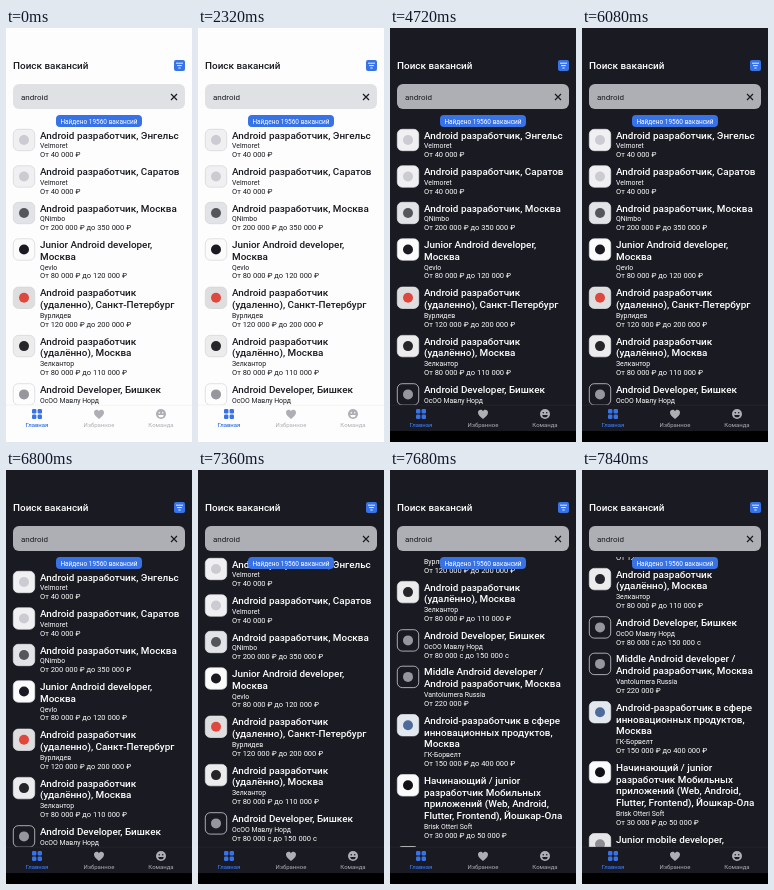
An HTML page that plays this animation: 186x414 px, repeating every 8 s.

```html
<!DOCTYPE html>
<html lang="ru">
<head>
<meta charset="utf-8">
<style>
  html, body { margin: 0; width: 100%; height: 100%; overflow: hidden; }
  svg {
    display: block; width: 100vw; height: 100vh;
    --bg: #fdfdfd; --ink: #1a1b22; --field: #e0e1e4; --edge: #d3d4d8; --line: #e6e8eb; --strip: #fdfdfd; --idle: #aeafb4;
    background: var(--bg); fill: var(--ink);
    font-family: Roboto, "Noto Sans", sans-serif;
  }
  svg.dark { --bg: #1a1b22; --ink: #fdfdfd; --field: #aeafb4; --edge: #e6e8eb; --line: #2a2b31; --strip: #000; }
  .bg { fill: var(--bg); }
  .blue { fill: #3772e7; }
  .title { font-size: 9.9px; font-weight: 500; }
  .firm { font-size: 6.9px; }
  .pay { font-size: 7.5px; }
  .tile { stroke: var(--edge); stroke-width: .7; }
  .nav { font-size: 6px; text-anchor: middle; fill: var(--idle); }
  .nav .blue { fill: #3772e7; font-weight: 500; }
</style>
</head>
<body>
<svg id="app" viewBox="0 0 186 414">
  <clipPath id="view"><rect y="87" width="186" height="327"/></clipPath>
  <g clip-path="url(#view)"><g id="list"></g></g>

  <text class="title" x="7" y="41.2">Поиск вакансий</text>
  <rect class="blue" x="168" y="32" width="11" height="11" rx="2"/>
  <path d="M170 35.2h7M171.2 37.6h4.6M172.4 40h2.2" stroke="#fff" stroke-width=".9"/>

  <rect x="7" y="56" width="172" height="25" rx="6" fill="var(--field)"/>
  <text x="15" y="71.6" font-size="8" fill="#1a1b22">android</text>
  <path d="M165 66l6 6m0-6l-6 6" stroke="#1a1b22" stroke-width="1.2"/>

  <rect class="blue" x="50" y="87" width="86" height="12" rx="4"/>
  <text x="93" y="95.8" font-size="6.5" text-anchor="middle" fill="#fff">Найдено 19560 вакансий</text>

  <g id="nav" class="nav">
    <rect class="bg" y="377" width="186" height="40"/>
    <path d="M0 377.2h186" stroke="var(--line)" stroke-width=".5"/>
    <g class="blue">
      <rect x="26" y="381" width="4.4" height="4.4" rx="1.2"/>
      <rect x="31.6" y="381" width="4.4" height="4.4" rx="1.2"/>
      <rect x="26" y="386.6" width="4.4" height="4.4" rx="1.2"/>
      <rect x="31.6" y="386.6" width="4.4" height="4.4" rx="1.2"/>
      <text x="31" y="399.2">Главная</text>
    </g>
    <path d="M93 391C90 388.6 88 387 88 384.6C88 381.6 91.6 380.8 93 383.2C94.4 380.8 98 381.6 98 384.6C98 387 96 388.6 93 391Z"/>
    <text x="93" y="399.2">Избранное</text>
    <circle cx="155" cy="386" r="5"/>
    <circle class="bg" cx="153.3" cy="384.8" r=".8"/>
    <circle class="bg" cx="156.7" cy="384.8" r=".8"/>
    <path class="bg" d="M152.3 387h5.4a2.7 2.3 0 0 1-5.4 0"/>
    <text x="155" y="399.2">Команда</text>
  </g>
  <rect id="strip" y="403" width="186" height="11" fill="var(--strip)"/>
</svg>
<script>
const LOOP = 8000, DARK = 3520, NAV_UP = 4720, FLING = 7360, STEP = 80;
const offsets = [13, 82, 148, 180, 196, 204, 209];
const LINE = 11.8, GAP = 24.7;

// title lines, company, pay, tile colour, mark colour
const jobs = [
  ['Android разработчик, Энгельс', 'Velmoret', 'От 40 000 ₽', '#f0f0f2', '#cbccd1'],
  ['Android разработчик, Саратов', 'Velmoret', 'От 40 000 ₽', '#f0f0f2', '#cbccd1'],
  ['Android разработчик, Москва', 'QNimbo', 'От 200 000 ₽ до 350 000 ₽', '#e2e3e6', '#55565c'],
  ['Junior Android developer,|Москва', 'Qevlo', 'От 80 000 ₽ до 120 000 ₽', '#fbfbfb', '#1a1b22'],
  ['Android разработчик|(удаленно), Санкт-Петербург', 'Вурлидев', 'От 120 000 ₽ до 200 000 ₽', '#dededf', '#e0483e'],
  ['Android разработчик|(удалённо), Москва', 'Зелкантор', 'От 80 000 ₽ до 110 000 ₽', '#ececec', '#26262a'],
  ['Android Developer, Бишкек', 'ОсОО Мавлу Норд', 'От 80 000 с до 150 000 с', 'var(--bg)', '#96979d'],
  ['Middle Android developer /|Android разработчик, Москва', 'Vantolumera Russia', 'От 220 000 ₽', 'var(--bg)', '#96979d'],
  ['Android-разработчик в сфере|инновационных продуктов,|Москва', 'ГК-Борвелт', 'От 150 000 ₽ до 400 000 ₽', '#e3e8ef', '#4d6c9c'],
  ['Начинающий / junior|разработчик Мобильных|приложений (Web, Android,|Flutter, Frontend), Йошкар-Ола', 'Brisk Otteri Soft', 'От 30 000 ₽ до 50 000 ₽', '#fbfbfb', '#111116'],
  ['Junior mobile developer,', '', '', '#e6e6e8', '#8d8e94'],
];

const $ = id => document.getElementById(id);
const text = (kind, y, s) => `<text class="${kind}" x="34" y="${y}">${s}</text>`;

let rowY = 101;
$('list').innerHTML = jobs.map(([title, firm, pay, tile, mark]) => {
  const lines = title.split('|');
  const first = rowY + 9.5;
  const last = first + (lines.length - 1) * LINE;
  const row = `<rect class="tile" x="7.3" y="${rowY + .3}" width="21.4" height="21.4" rx="5" fill="${tile}"/>
    <circle cx="18" cy="${rowY + 11}" r="5" fill="${mark}"/>` +
    lines.map((s, i) => text('title', first + i * LINE, s)).join('') +
    text('firm', last + 9.9, firm) + text('pay', last + 18.6, pay);
  rowY += lines.length * LINE + GAP;
  return row;
}).join('');

function draw(now) {
  const t = now % LOOP;
  const step = Math.min(offsets.length - 1, Math.floor((t - FLING) / STEP));
  const low = t >= DARK && t < NAV_UP;
  $('app').classList.toggle('dark', t >= DARK);
  $('list').setAttribute('transform', `translate(0 ${step < 0 ? 0 : -offsets[step]})`);
  $('nav').setAttribute('transform', `translate(0 ${low ? 11 : 0})`);
  $('strip').setAttribute('visibility', low ? 'hidden' : 'visible');
  requestAnimationFrame(draw);
}
draw(performance.now());
</script>
</body>
</html>
```
